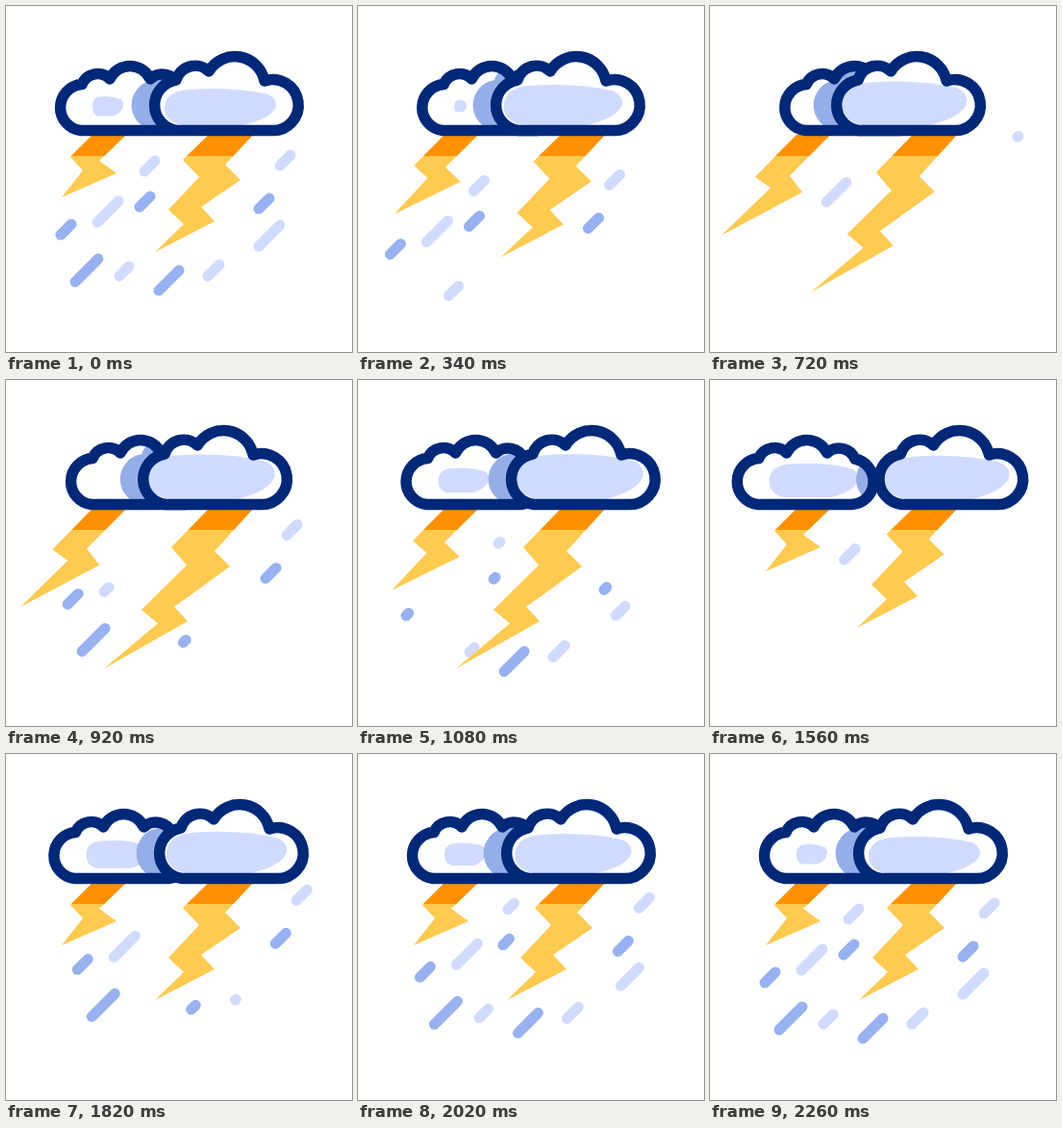
These frames come from a looping animation (360 px wide and 360 px high, 2400 ms). An HTML page with a canvas:

```html
<!DOCTYPE html>
<html lang="en">
<head>
<meta charset="utf-8">
<title>Thunderstorm</title>
<style>
  html, body { margin: 0; width: 100%; height: 100%; overflow: hidden; background: #fff; }
  canvas { display: block; width: 100vw; height: 100vh; object-fit: contain; }
</style>
</head>
<body>
<canvas id="stage" width="360" height="360"></canvas>
<script>
const ctx = document.getElementById('stage').getContext('2d');
const LOOP = 2400, REST = 2260;
const NAVY = '#002878', LIGHT = '#d0dbff', BLUE = '#97b1f2', SHADE = '#96aee8';
const YELLOW = '#ffca50', ORANGE = '#ff9100';

const FRONT = new Path2D(`M178 129.5A26.5 26.5 0 0 1 177 77A20.5 20.5 0 0 1 211 68
  A31.5 31.5 0 0 1 269 78A26.5 26.5 0 1 1 276.5 129.5Z`);
const BACK = new Path2D(`M78 129.5A24.1 24.1 0 0 1 79 81.5A17.7 17.7 0 0 1 108 76
  A23 23 0 0 1 150 76A18 18 0 0 1 179 82A24 24 0 0 1 176 129.5Z`);

// Corners: x, y, and how far the corner is pulled left when the bolt strikes
const SMALL_BOLT = [[90, 134, 0], [125, 134, 0], [97, 161, 14], [115, 174, 19],
  [58, 199, 46], [80, 171, 17], [67, 157, 20]];
const LARGE_BOLT = [[211, 134, 0], [257, 134, 0], [228, 165, 11], [244, 181, 11],
  [203, 209, 28], [217, 224, 28], [155, 256, 53], [185, 227, 27], [169, 212, 28],
  [201, 178, 13], [184, 160, 12]];

// Each drop passes three times: leaving, crossing, arriving.
// Rows: head x, head y, length, colour, time of the crossing
const GAP = 80, TRIM = 120, STAY = 220, PERIOD = 890;
const SHOWERS = [
  { leave: 220, drops: [
    [72, 287, 24, BLUE, 740], [159, 296, 21, BLUE, 905],
    [210, 281, 12, LIGHT, 925], [263, 250, 22, LIGHT, 1028]
  ] },
  { leave: 400, drops: [
    [57, 238, 11, BLUE, 770], [95, 225, 22, LIGHT, 608], [144, 172, 11, LIGHT, 1060],
    [139, 209, 11, BLUE, 1060], [118, 281, 10, LIGHT, 1020],
    [263, 211, 11, BLUE, 770], [285, 166, 11, LIGHT, 712]
  ] }
];

const clamp = v => Math.max(0, Math.min(1, v));
const ramp = (t, start, length) => clamp((t - start) / length);
const ease = (t, from, to) => (1 - Math.cos(Math.PI * ramp(t, from, to - from))) / 2;

function drawDrop(t, leave, fall, drift, [x, y, length, color, cross]) {
  const spans = [[-LOOP, leave], [cross, cross + STAY], [cross + PERIOD, LOOP]];
  ctx.strokeStyle = color;
  spans.forEach(([show, hide], pass) => {
    const grown = ramp(t, show, TRIM), gone = ramp(t, hide, TRIM);
    if (grown === 0 || gone === 1) return;
    const shift = pass * GAP - fall;
    const tailX = x + length + shift, tailY = y - length - 0.84 * shift + drift;
    ctx.beginPath();
    ctx.moveTo(tailX - length * gone, tailY + length * gone);
    ctx.lineTo(tailX - length * grown, tailY + length * grown);
    ctx.stroke();
  });
}

function drawRain(t) {
  const u = t / REST;
  const fall = 2 * GAP * u + u * (1 - u) * (142 * u - 26);
  const drift = 1.4 * Math.sin(Math.PI * u);
  ctx.lineWidth = 11;
  ctx.lineCap = 'round';
  for (const { leave, drops } of SHOWERS) {
    for (const drop of drops) drawDrop(t, leave, fall, drift, drop);
  }
}

function drawBolt(corners, strike) {
  const path = new Path2D();
  for (const [x, y, pull] of corners) {
    path.lineTo(x - pull * strike, y + 2 * pull ** 0.78 * strike);
  }
  path.closePath();
  ctx.fillStyle = YELLOW;
  ctx.fill(path);
  ctx.save();
  ctx.beginPath();
  ctx.rect(0, 0, 360, 156);
  ctx.clip();
  ctx.fillStyle = ORANGE;
  ctx.fill(path);
  ctx.restore();
}

function drawTint(l, top, w, h) {
  const px = f => l + w * f, py = f => top + h * f;
  ctx.fillStyle = LIGHT;
  ctx.beginPath();
  ctx.moveTo(l, py(0.55));
  ctx.quadraticCurveTo(l, py(0.12), px(0.2), py(0.05));
  ctx.quadraticCurveTo(px(0.6), py(-0.04), px(0.92), py(0.17));
  ctx.quadraticCurveTo(px(1), py(0.25), px(1), py(0.48));
  ctx.quadraticCurveTo(px(0.97), py(0.82), px(0.7), py(1));
  ctx.lineTo(px(0.16), py(1));
  ctx.quadraticCurveTo(l, py(0.9), l, py(0.55));
  ctx.fill();
}

function drawCloud(shape, x, paintInside) {
  ctx.save();
  ctx.translate(x, 0);
  ctx.fillStyle = '#fff';
  ctx.fill(shape);
  ctx.save();
  ctx.clip(shape);
  paintInside();
  ctx.restore();
  ctx.strokeStyle = NAVY;
  ctx.lineWidth = 11.5;
  ctx.lineJoin = 'round';
  ctx.stroke(shape);
  ctx.restore();
}

function drawClouds(t) {
  // Closing in, drifting apart, settling
  const frontX = -23 * ease(t, 0, 700) + 48 * ease(t, 700, 1390) - 25 * ease(t, 1420, 1990);
  const backX = -frontX * (frontX < 0 ? 0.93 : 1.32);
  const swell = Math.sin(Math.PI * t / REST);
  const backTint = 32 - 32 * ease(t, 0, 600) + 98 * ease(t, 950, 1200) - 66 * ease(t, 1400, REST);

  drawCloud(BACK, backX, () => {
    const height = Math.min(backTint, 13 + backTint / 4);
    drawTint(90, 104 - height / 2, backTint, height);
    ctx.translate(frontX - backX - 24, 0);
    ctx.fillStyle = SHADE;
    ctx.fill(FRONT);
  });
  drawCloud(FRONT, frontX, () =>
    drawTint(165 - 5 * swell, 85 - 9 * swell, 116 + 16 * swell, 39 + 9 * swell));
}

function draw(t) {
  ctx.fillStyle = '#fff';
  ctx.fillRect(0, 0, 360, 360);
  drawRain(t);
  drawBolt(SMALL_BOLT, ease(t, 0, 740) - ease(t, 840, 1320));
  drawBolt(LARGE_BOLT, ease(t, 200, 820) - ease(t, 1140, 1620));
  drawClouds(t);
}

function tick() {
  draw(Math.min(performance.now() % LOOP, REST));
  requestAnimationFrame(tick);
}
tick();
</script>
</body>
</html>
```
